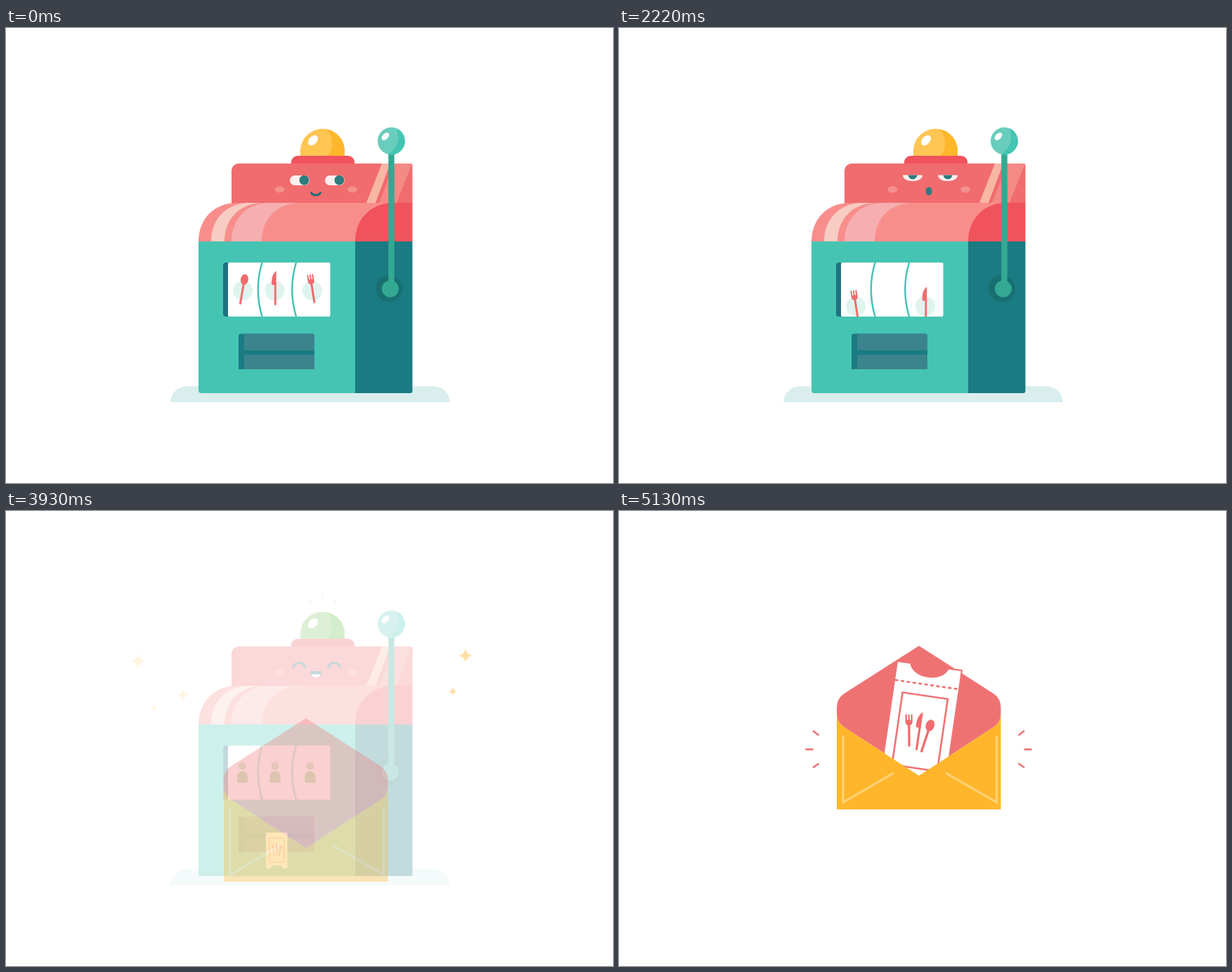
These frames come from a looping animation (864x648 px, 5.4 s). An HTML page:

```html
<!DOCTYPE html>
<html lang="en">
<head>
<meta charset="utf-8">
<title>Lunch slot machine</title>
<style>
  html, body { margin: 0; width: 100%; height: 100%; overflow: hidden; background: #fff; }
  svg { display: block; width: 100vw; height: 100vh; }
  .line { fill: none; stroke-linecap: butt; }
</style>
</head>
<body>
<svg viewBox="0 0 864 648">
  <defs>
    <clipPath id="windowClip"><rect x="316" y="334" width="145.5" height="77" rx="2"/></clipPath>
    <clipPath id="slotClip"><rect x="360" y="458" width="60" height="60"/></clipPath>
    <clipPath id="eyeClip"><rect x="404" y="210" width="28" height="14" rx="7"/></clipPath>
    <clipPath id="sleepyClip"><path d="M404 209.5h28c0 5.500-6 8.500-14 8.500s-14-3-14-8.500z"/></clipPath>

    <circle id="plate" cx="0" cy="2" r="14" fill="#dff4ee"/>
    <g id="spoon" transform="rotate(10)" fill="#f06c6e">
      <ellipse cy="-14" rx="5.500" ry="7.500"/><rect x="-1.500" y="-9" width="3" height="31" rx="1.500"/>
    </g>
    <g id="knife" fill="#f06c6e">
      <path d="M2.200-26C-4-22-5-12-4-6H2.200z"/><rect x="-.6" y="-10" width="2.800" height="33" rx="1.400"/>
    </g>
    <g id="fork" transform="rotate(-9)" fill="#f06c6e">
      <path d="M-4.500-21h2v7h1.500v-7h2v7h1.500v-7h2v9c0 3-1.500 5-4.500 5s-4.500-2-4.500-5z"/>
      <rect x="-1.500" y="-9" width="3" height="29" rx="1.500"/>
    </g>
    <g id="person">
      <circle cy="-9" r="5.500" fill="#8ccb72"/>
      <path d="M-7.500 15V6a7.500 7.500 0 0 1 15 0v9z" fill="#5bbd41"/>
    </g>
    <g id="cutlery">
      <use href="#fork" x="-12"/><use href="#knife"/><use href="#spoon" x="11" y="3"/>
    </g>
    <path id="awningStripe" d="M0 55C0 23 22 0 55 0"/>
    <path id="star" d="M0-1Q.16-.16 1 0 .16.16 0 1-.16.16-1 0-.16-.16 0-1z" fill="#ffc04d"/>
  </defs>

  <g id="sparkles"></g>

  <g id="machine">
    <path d="M234 533C235 519 245 510 259 510H607C621 510 631 519 632 533z" fill="#daeeee"/>
    <!-- sign -->
    <path d="M321 250V203a10 10 0 0 1 10-10H575.500a3 3 0 0 1 3 3V250z" fill="#f06c6e"/>
    <path d="M535 193h12L526 249H513z" fill="#f8b6a5"/>
    <path d="M553 193h25L556 249H531z" fill="#f38a85"/>
    <!-- awning -->
    <path d="M274 304.500C274 272 296 249 329 249H560V304.500z" fill="#f88e8c"/>
    <path d="M292 304c0-32 22-55 55-55h19c-33 0-55 23-55 55z" fill="#f7ccc3"/>
    <path d="M321 304c0-32 22-55 55-55h43c-33 0-55 23-55 55z" fill="#f6aeb0"/>
    <path d="M497 304.500C497 272 519 249 552 249H578.500V304.500z" fill="#f0535c"/>
    <!-- body -->
    <path d="M274 304H497V520H278a4 4 0 0 1-4-4z" fill="#45c4b3"/>
    <path d="M497 304H578.500V517a3 3 0 0 1-3 3H497z" fill="#1a7b82"/>
    <!-- bulb -->
    <path d="M406 193v-2a9 9 0 0 1 9-9H487a9 9 0 0 1 9 9v2z" fill="#f0535c"/>
    <path id="bulb" d="M419 182V175a31.500 31.500 0 0 1 63 0V182z"/>
    <path id="bulbShade" d="M456 144C467 156 466 173 458 182H482V175A31.500 31.500 0 0 0 456 144z"/>
    <ellipse rx="5.500" ry="8.500" transform="translate(437 160) rotate(42)" fill="#fff"/>
    <g id="bulbRays" class="line" stroke="#90d27f" stroke-width="2.200" stroke-linecap="round">
      <path d="M450.500 130v-5"/><path d="M437.500 135l-4-4"/><path d="M463.500 135l4-4"/>
    </g>
    <!-- face -->
    <g fill="#f4908d">
      <ellipse cx="389.500" cy="230" rx="7" ry="4.500"/><ellipse cx="493" cy="230" rx="7" ry="4.500"/>
    </g>
    <g id="open">
      <g id="eye"><rect x="404" y="210" width="28" height="14" rx="7" fill="#fbeeee"/>
        <g clip-path="url(#eyeClip)"><circle id="pupil" r="7" fill="#2f7b7d"/></g></g>
      <use href="#eye" x="50"/>
    </g>
    <g id="sleepy">
      <g id="lidded" clip-path="url(#sleepyClip)"><rect x="404" y="209" width="28" height="9" fill="#fbeeee"/>
        <circle cx="418" cy="209" r="6.500" fill="#2f7b7d"/></g>
      <use href="#lidded" x="50"/>
    </g>
    <path id="smile" class="line" d="M434 233.500c2 6 12 6 14 0" stroke="#1d6f74" stroke-width="3"/>
    <ellipse id="gasp" cx="441" cy="232.500" rx="4.500" ry="6" fill="#2f7b7d"/>
    <g id="happy">
      <path class="line" d="M409 223c2-9 15-9 17 0M459 223c2-9 15-9 17 0" stroke="#1d6f74" stroke-width="3.200"/>
      <path d="M433 228h16.500c0 6-4 9-8.250 9s-8.250-3-8.250-9z" fill="#1d6f74"/>
      <path d="M435 232.500h12.500c-1 3-3 4.500-6.250 4.500s-5.250-1.500-6.250-4.500z" fill="#fff"/>
    </g>
    <!-- reels -->
    <path d="M318 334H313a4 4 0 0 0-4 4V407a4 4 0 0 0 4 4h5z" fill="#1d737f"/>
    <rect x="316" y="334" width="145.500" height="77" rx="2" fill="#fff"/>
    <g id="reels" clip-path="url(#windowClip)"></g>
    <path class="line" d="M364.500 334Q353 372 364.500 411M413 334Q401.500 372 413 411" stroke="#45c4b3" stroke-width="2.500"/>
    <!-- slot -->
    <path d="M334 435.500H436a3 3 0 0 1 3 3V486H331V438.500a3 3 0 0 1 3-3z" fill="#1a7b82"/>
    <path d="M339 435.500H436a3 3 0 0 1 3 3V459H339zM339 465.500H439V486H339z" fill="#3b848e"/>
    <g clip-path="url(#slotClip)"><g id="voucher">
      <path d="M370 458H400.500V509H394.500c-2-6-16-6-18 0H370z" fill="#fff"/>
      <rect x="375" y="465.500" width="21" height="34.500" class="line" stroke="#f06c6e" stroke-width="1.200"/>
      <use href="#cutlery" transform="translate(385.500 483) scale(.4)"/>
    </g></g>
    <!-- lever -->
    <circle cx="545" cy="371" r="19" fill="#186f71"/>
    <circle cx="547" cy="371.500" r="12" fill="#33a993"/>
    <g id="lever">
      <path id="stick" class="line" stroke="#33a993" stroke-width="8.500"/>
      <g id="ball">
        <circle r="19.500" fill="#69cdbd"/>
        <path d="M7-18.200C13-5 10 9-5 18.800A19.500 19.500 0 0 0 7-18.200z" fill="#45c4b3"/>
        <ellipse rx="4" ry="6.500" transform="translate(-8.500 -6.500) rotate(45)" fill="#fff"/>
      </g>
    </g>
  </g>

  <g id="envelope">
    <path d="M427 192L533 260Q543.500 267 543.500 280V289Q543.500 301 533 308L427 377 320.500 308Q310 301 310 289V280Q310 267 320.500 260z" fill="#ef7273"/>
    <g id="ticket" class="line" stroke="#ef7273">
      <path d="M-46.500 0H-27C-21 21 21 21 27 0H46.500V160H-46.500z" fill="#fff" stroke-width="2"/>
      <path d="M-46 27H46" stroke-width="2.600" stroke-dasharray="5 3.500"/>
      <rect x="-32.500" y="43" width="65" height="104" stroke-width="2.600"/>
      <use href="#cutlery" transform="translate(-2 96) scale(1.120)" stroke="none"/>
    </g>
    <path d="M310 289Q310 301 320.500 308L427 377 533 308Q543.500 301 543.500 289V425H310z" fill="#ffb62b"/>
    <path class="line" d="M319 320V415L391 373M537.500 320V415L465 373" stroke="#ffd070" stroke-width="3.500"/>
  </g>
  <g id="popRays" class="line" stroke="#ef7273" stroke-width="2.600">
    <g id="popLeft"><path d="M284.500 319.500l-8.500-6.500"/><path d="M276.500 339.500h-11"/><path d="M284.500 359.500l-8.500 6"/></g>
    <g id="popRight"><path d="M568.500 319.500l8.500-6.500"/><path d="M576.500 339.500h11"/><path d="M568.500 359.500l8.500 6"/></g>
  </g>
</svg>
<script>
const LOOP = 5400, WIN = 2690, SYMBOL_GAP = 140;
const el = {};
document.querySelectorAll('[id]').forEach(node => el[node.id] = node);

const set = (node, attrs) => { for (const key in attrs) node.setAttribute(key, attrs[key]); };
const add = (parent, tag, attrs) => {
  const node = document.createElementNS('http://www.w3.org/2000/svg', tag);
  set(node, attrs);
  return parent.appendChild(node);
};
const show = (node, visible) => set(node, { display: visible ? 'inline' : 'none' });
const progress = (t, from, to) => Math.min(1, Math.max(0, (t - from) / (to - from)));
const smooth = u => u * u * (3 - 2 * u);
const easeIn = u => u * u;
const easeOut = u => 1 - (1 - u) ** 3;
const easeInOut = u => u < .5 ? 2 * u * u : 1 - 2 * (1 - u) ** 2;
const mix = (a, b, u) => `rgb(${a.map((v, i) => Math.round(v + (b[i] - v) * u))})`;

const reels = [
  { x: 337, endX: 336.5, start: 1440, end: 2548, symbols: ['spoon', 'knife', 'spoon', 'fork', 'person'] },
  { x: 382.5, endX: 383, start: 1560, end: WIN, symbols: ['knife', 'fork', 'spoon', 'knife', 'person'] },
  { x: 436, endX: 433, start: 1440, end: 2548, symbols: ['fork', 'spoon', 'fork', 'knife', 'person'] }
];
for (const reel of reels) {
  reel.node = add(el.reels, 'g', {});
  reel.symbols.forEach((name, i) => {
    const person = name === 'person';
    const cell = add(reel.node, 'g', { transform: `translate(${person ? reel.endX : reel.x} ${372 - i * SYMBOL_GAP})` });
    if (!person) add(cell, 'use', { href: '#plate' });
    add(cell, 'use', { href: '#' + name });
  });
}

// x, y, radius, moment of full brightness
const sparkles = [
  [216, 213, 11, 3720], [624, 215, 11, 3630], [202, 260, 5, 3610], [237, 275, 5, 3720], [610, 286, 7, 3600],
  [654, 206, 10, 3940], [636, 257, 6, 3940], [188, 214, 11, 4050], [252, 262, 9, 4050], [211, 280, 5, 4050],
  [666, 288, 6, 3480]
].map(([x, y, r, peak]) => ({
  peak, node: add(el.sparkles, 'use', { href: '#star', transform: `translate(${x} ${y}) scale(${r})` })
}));

function drawLever(t) {
  const pull = smooth(progress(t, 780, 1200)) - smooth(progress(t, 1290, 1570));
  const top = -210 + 5 * pull;
  set(el.lever, { transform: `translate(547 371) rotate(${-89 * pull})` });
  set(el.stick, { d: `M1.5 ${top + 18}V0` });
  set(el.ball, { transform: `translate(1.5 ${top})` });
  set(el.pupil, { cx: 424.5 - 7 * pull, cy: 216.7 + 8 * pull });
}

function drawFace(t) {
  const won = t >= WIN, sleepy = t >= 1620 && !won;
  show(el.open, t < 1620);
  show(el.sleepy, sleepy);
  show(el.smile, t < 960);
  show(el.gasp, t >= 960 && !won);
  show(el.happy, won);
}

function drawBulb(t) {
  const won = t >= WIN;
  const flash = t > 1248 && t < 2544 ? .5 - .5 * Math.cos((t - 1248) / 324 * 2 * Math.PI) : 0;
  set(el.bulb, { fill: won ? '#7ec663' : mix([255, 197, 83], [255, 236, 80], flash) });
  set(el.bulbShade, { fill: won ? '#5bbd41' : mix([255, 182, 43], [255, 217, 31], flash) });
  const u = ((t - WIN + 260) % 540) / 540, out = 13 * u - 5;
  show(el.bulbRays, won);
  set(el.bulbRays, { opacity: Math.min(1, 2.4 * (1 - u), 6 * u) });
  [0, -.6, .6].forEach((dx, i) =>
    set(el.bulbRays.children[i], { transform: `translate(${dx * out} ${dx ? -.7 * out : -out})` }));
}

function drawSparkles(t) {
  set(el.sparkles, { opacity: 1 - progress(t, 3780, 4080) });
  for (const { peak, node } of sparkles) {
    const cycle = Math.round((t - peak) / 600), offset = t - peak - cycle * 600;
    const visible = peak + cycle * 600 > 2990;
    set(node, { opacity: visible ? Math.max(0, Math.cos(offset / 300 * Math.PI)) : 0 });
  }
}

function drawEnvelope(t) {
  const rise = 140 - 202 * easeInOut(progress(t, 3780, 4280));
  const dip = 64 * easeInOut(progress(t, 4470, 4690)) - 2 * smooth(progress(t, 4690, 4800));
  const y = rise + dip;
  set(el.envelope, { transform: `translate(0 ${y})`, opacity: progress(t, 3830, 4130) });
  const fall = -201 * (1 - easeIn(progress(t, 4500, 4690)));
  set(el.ticket, {
    transform: `translate(442 ${220.5 + fall - y}) rotate(8.3)`,
    opacity: progress(t, 4430, 4500)
  });
  const pop = easeOut(progress(t, 4680, 4980));
  show(el.popRays, t > 4680);
  set(el.popRays, { opacity: Math.min(1, pop * 2) });
  set(el.popLeft, { transform: `translate(${12 * (1 - pop)} 0)` });
  set(el.popRight, { transform: `translate(${-12 * (1 - pop)} 0)` });
}

function draw(t) {
  drawLever(t);
  drawFace(t);
  drawBulb(t);
  drawSparkles(t);
  drawEnvelope(t);
  for (const { node, start, end } of reels)
    set(node, { transform: `translate(0 ${4 * SYMBOL_GAP * smooth(progress(t, start, end))})` });
  set(el.voucher, { transform: `translate(0 ${-52 * (1 - easeOut(progress(t, 2750, 3150)))})` });
  set(el.machine, { opacity: 1 - progress(t, 3780, 3985) });
}

const began = performance.now();
function tick() {
  draw((performance.now() - began) % LOOP);
  requestAnimationFrame(tick);
}
tick();
</script>
</body>
</html>
```
